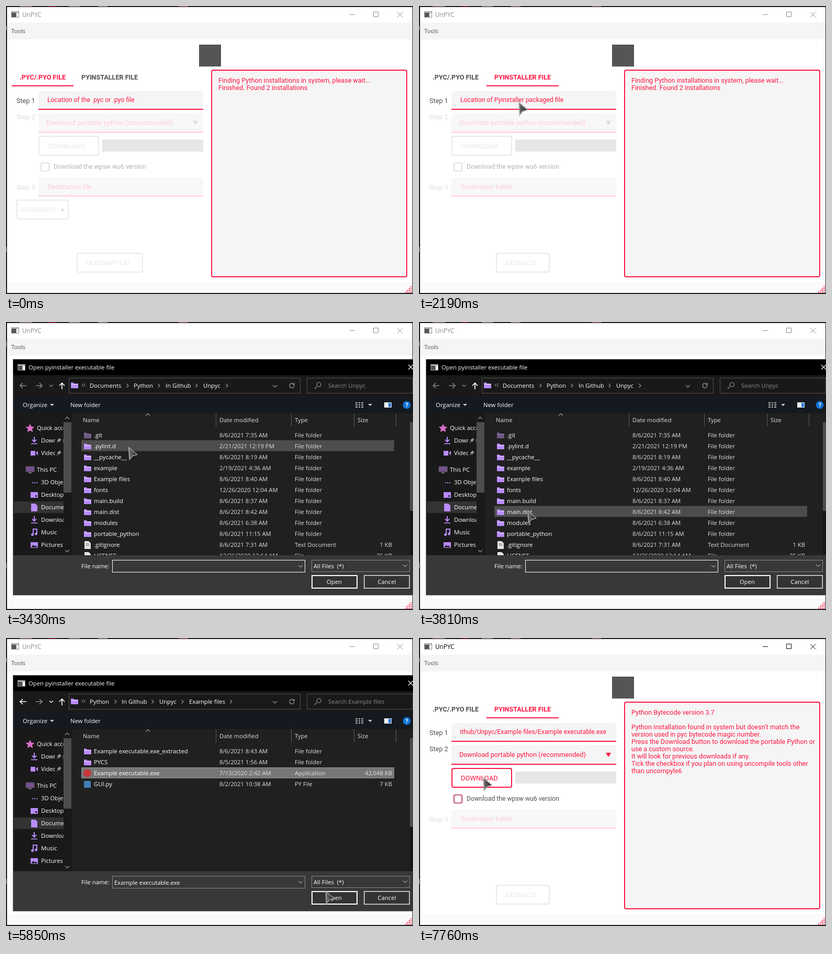
These frames come from a looping animation (778x552 px, 8 s). An HTML page:

```html
<!DOCTYPE html>
<html lang="en">
<head>
<meta charset="utf-8">
<title>UnPYC</title>
<style>
  html, body { margin: 0; width: 100%; height: 100%; overflow: hidden; background: #1b1b1d; }
  svg { display: block; width: 100vw; height: 100vh; }
  text { white-space: pre; }
  .app { font-family: Roboto, sans-serif; }
  .sys { font-family: "Open Sans", "Noto Sans", sans-serif; font-size: 11.25px; }
  .caps { font-weight: 700; font-size: 13px; letter-spacing: 1px; }
</style>
</head>
<body>
<svg id="stage" viewBox="0 0 778 552"></svg>
<script>
const LOOP = 8000;
const PINK = '#ff1744', PALE = '#ffcdd6', DARK = '#4f4f4f', PANEL = '#f5f5f5', FAINT = '#e9e9e9', LILAC = '#b98cff';

// Markup helpers
const rect = (x, y, w, h, fill, extra = '') =>
  `<rect x="${x}" y="${y}" width="${w}" height="${h}" fill="${fill}" ${extra}/>`;
const frame = (x, y, w, h, stroke, fill = 'none', width = 2, radius = 3) =>
  rect(x + width / 2, y + width / 2, w - width, h - width, fill, `stroke="${stroke}" stroke-width="${width}" rx="${radius}"`);
const line = (d, stroke, width = 1) => `<path d="${d}" fill="none" stroke="${stroke}" stroke-width="${width}"/>`;
const fill = (d, color) => `<path d="${d}" fill="${color}"/>`;
const at = (x, y, content) => `<g transform="translate(${x} ${y})">${content}</g>`;
const group = (id, content) => `<g id="${id}">${content}</g>`;
const app = (x, y, s, color, size = 12.6, extra = '') =>
  `<text class="app" x="${x}" y="${y}" fill="${color}" font-size="${size}" ${extra}>${s}</text>`;
const sys = (x, y, s, color = '#fff', extra = '') =>
  `<text class="sys" x="${x}" y="${y}" fill="${color}" ${extra}>${s}</text>`;
const chevron = (x, y, dx, dy, color = '#9a9a9a') =>
  line(dx ? `M${x - 1.5} ${y - 3.5}l3.5 3.5l-3.5 3.5` : `M${x - 4} ${y - 2 * dy}l4 ${4 * dy}l4 ${-4 * dy}`, color, 1.2);
const windowIcon = (x, y) => at(x, y,
  rect(0, 0, 15, 12, '#8d8d8d') + rect(1, 3, 8, 8, '#555') + rect(10, 3, 4, 8, '#fff') + rect(1, 1, 13, 1, '#e8e8e8'));

// Main window
function windowShell() {
  const specks = rect(82, 0, 14, 1, '#c4122f') + rect(26, 0, 24, 1, '#d7a5a8') + rect(176, 0, 18, 1, '#e3b4b8') +
    rect(120, 0, 22, 1, '#bbb') + rect(330, 0, 18, 1, '#e88') + rect(0, 38, 1, 8, '#aaa') + rect(0, 462, 1, 10, '#aaa');
  let grip = '';
  for (let row = 0; row < 4; row++)
    for (let col = 3 - row; col < 4; col++) grip += rect(763 + col * 3.5, 537 + row * 3.5, 2, 2, PINK);
  return rect(0, 0, 778, 552, '#1b1b1d') + specks + rect(2, 2, 775, 548, '#fff') + rect(2, 32, 775, 32, PANEL) +
    rect(2, 529, 775, 21, '#fafafa') + grip + windowIcon(10, 10) + sys(10, 52, 'Tools', DARK) +
    group('caption', sys(31, 21, 'UnPYC', 'currentColor', 'style="font-size:11.8px"') +
      line('M657 16.5h10M702.5 11.5h9v9h-9zM748 11.5l10 10M758 11.5l-10 10', 'currentColor'));
}

function button(x, y, w, label, textX, color) {
  return frame(x, y, w, 38, color, '#fff') + app(textX, y + 24, label, color, 13, 'class="app caps"');
}

function field(y, h, on) {
  return fill(`M62 ${y + h}v${4 - h}q0 -4 4 -4h307q4 0 4 4v${h - 4}z`, on ? PANEL : '#f8f8f8') +
    rect(62, y + h - 2, 315, 2, on ? PINK : PALE);
}

function page({ tab, location, alignEnd, ready, destination, log, buttons }) {
  const pick = on => on ? PINK : PALE;
  const step = (y, n, on) => app(20, y, 'Step ' + n, on ? DARK : '#dcdcdc');
  const tabLabel = (x, s, i) => app(x, 141, s, tab === i ? PINK : DARK, 12.6, 'font-weight="700"');
  return rect(369, 74, 42, 42, '#555') +
    tabLabel(26, '.PYC/.PYO FILE', 0) + tabLabel(144, 'PYINSTALLER FILE', 1) +
    (tab ? rect(129, 152, 138, 2, PINK) : rect(11, 152, 118, 2, PINK)) +
    step(186, 1, true) + field(163, 36, true) +
    (alignEnd
      ? `<svg x="78" y="163" width="290" height="34">${app(280, 21, location, PINK, 12.25, 'text-anchor="end"')}</svg>`
      : app(79, 184, location, PINK, 12.25)) +
    step(217, 2, ready) + field(205, 38, ready) +
    app(77, 228, 'Download portable python (recommended)', pick(ready), 12.7) +
    fill('M357 220h10l-5 8z', ready ? PINK : '#dcdcdc') +
    button(62, 249, 116, 'DOWNLOAD', 80, ready ? PINK : FAINT) + rect(184, 256, 193, 23, '#e6e6e6') +
    frame(66, 300, 17, 17, ready ? '#b5304f' : '#dcdcdc', '#fff', 1.6, 2) +
    app(91, 312, 'Download the wpsw wu6 version', ready ? DARK : '#b4b4b4', 12.2) +
    step(352, 3, false) + field(329, 36, false) + app(80, 351, destination, PALE, 12.5) + buttons +
    frame(392, 122, 375, 398, PINK, PANEL) + log.map((s, i) => app(406, 147 + 14 * i, s, PINK)).join('');
}

const searchLog = ['Finding Python installations in system, please wait...', 'Finished. Found 2 installations'];
const extract = { tab: 1, destination: 'Destination folder', buttons: button(147, 473, 103, 'EXTRACT!', 165, FAINT) };
const pages = {
  pycPage: page({
    tab: 0, location: 'Location of the .pyc or .pyo file', destination: 'Destination file', log: searchLog,
    buttons: button(20, 371, 100, 'ADVANCED', 27, FAINT) + fill('M106 387l6 3.5l-6 3.5z', '#dcdcdc') +
      button(135, 473, 127, 'UMCOMPYLE!', 153, FAINT)
  }),
  exePage: page({ ...extract, location: 'Location of Pyinstaller packaged file', log: searchLog }),
  readyPage: page({
    ...extract, location: '/In Github/Unpyc/Example files/Example executable.exe', alignEnd: true, ready: true,
    log: ['Python Bytecode version 3.7', '',
      'Python installation found in system but doesn’t match the', 'version used in pyc bytecode magic number.',
      'Press the Download button to download the portable Python or', 'use a custom source.',
      'It will look for previous downloads if any.',
      'Tick the checkbox if you plan on using uncompile tools other', 'than uncompyle6']
  })
};

// File dialog
const icons = {
  folder: fill('M0 0h5l1 2h8v9H0z', LILAC) + rect(1, 3, 12, 1, '#ead9ff'),
  hidden: fill('M0 0h5l1 2h8v9H0z', '#6f5a86') + rect(1, 3, 12, 1, '#8d7a9f'),
  file: fill('M1 -2h8l4 4v11h-12z', '#e4e4e4'),
  text: fill('M1 -2h8l4 4v11h-12z', '#e4e4e4') + line('M3.5 2.5h6M3.5 4.5h7M3.5 6.5h7', '#888'),
  purpleFile: fill('M1 -2h8l4 4v11h-12z', LILAC),
  exe: '<circle cx="6.5" cy="5" r="7.5" fill="#c8383c"/>',
  py: rect(0, -1, 13, 13, '#3f7fb5'),
  star: fill('M7 -3l2.5 5.5l6 .6l-4.500 4l1.300 6l-5.300 -3.100l-5.300 3.100l1.300 -6l-4.500 -4l6 -.6z', '#d86fc8'),
  down: line('M7 -2v9M3 3.500l4 4l4 -4', LILAC, 2) + rect(1, 10.500, 12, 1.600, LILAC),
  video: rect(0, 1, 9, 9, LILAC) + fill('M10 5l4 -4v9z', LILAC),
  pc: rect(-1, -1, 16, 10, '#76508f', 'stroke="#555"') + rect(4, 10, 6, 2, '#777'),
  dots: [3, 7, 11].map(x => rect(x, 5, 2, 2, LILAC)).join(''),
  desktop: rect(0, 0, 14, 11, LILAC) + rect(9, 6, 3, 3, '#222'),
  music: line('M5 9v-10h7v8', LILAC, 2) + '<circle cx="3.5" cy="9.500" r="2.500" fill="#b98cff"/><circle cx="10.500" cy="8" r="2.500" fill="#b98cff"/>',
  picture: rect(0, 0, 14, 11, LILAC) + fill('M1 10l4 -5l3 3l2 -2l3 4z', '#222')
};
const icon = (name, x, centerY) => at(x, centerY - 5, icons[name]);

function sidebar() {
  const entry = (x, y, label) => sys(x, y + 4, label);
  const pin = y => rect(94, y - 9, 15, 18, '#191919') +
    fill(`M102 ${y - 5}l4 4l-2 1l-2 3l-2 -1l-4 4l3 -5l-1 -2l3 -2z`, '#8f8f9f');
  const places = [['3D Objects', 307], ['Desktop', 331], ['Documents', 355], ['Downloads', 379], ['Music', 403], ['Pictures', 427], ['Videos', 451]];
  return rect(14, 175, 112, 272, '#191919') + rect(15, 344, 95, 22, '#333') +
    entry(59, 203, 'Quick access') + entry(67, 227, 'Downloads') + entry(67, 251, 'Videos') + entry(59, 283, 'This PC') +
    places.map(([s, y]) => entry(67, y, s)).join('') + pin(227) + pin(251) +
    icon('star', 39, 203) + icon('pc', 39, 283) + icon('dots', 47, 307) + icon('desktop', 47, 331) + icon('down', 47, 379) +
    rect(110, 175, 16, 272, '#191919') + rect(110, 192, 15, 135, '#4d4d4d') +
    chevron(117, 184, 0, -1) + chevron(117, 439, 0, 1);
}

function sheet() {
  const columns = [['Name', 147], ['Date modified', 408], ['Type', 552], ['Size', 672]];
  return rect(14, 102, 764, 42, '#191919') + rect(14, 144, 764, 31, '#151a20') + rect(126, 175, 652, 272, '#202020') +
    frame(120, 107, 443, 30, '#535353', 'none', 1, 0) + frame(575, 107, 203, 30, '#535353', 'none', 1, 0) +
    line('M57 122h12M64 117l5 5l-5 5', '#858585', 1.700) + line('M107 129v-12M102 122l5 -5l5 5', '#fff', 1.700) +
    icon('folder', 124, 121) + line('M148 118l-3 3l3 3M152 118l-3 3l3 3', '#aaa') + chevron(514, 123, 0, 1) +
    line('M550 119a4.500 4.500 0 1 0 1 3M551 117v3h-3', '#999', 1.300) +
    line('M594 124l-4 4M594 120a4 4 0 1 1 8 0a4 4 0 1 1 -8 0', '#9a9a9a', 1.200) +
    sys(32, 163, 'Organize') + fill('M84 157h8l-4 4z', '#ccc') + sys(123, 163, 'New folder') +
    [154, 158, 162].map(y => rect(668, y, 4, 2, '#bbb') + rect(674, y, 3, 2, '#bbb') + rect(679, y, 4, 2, '#bbb')).join('') +
    fill('M692 157h8l-4 4z', '#ccc') + rect(723, 154, 14, 10, '#eee') + rect(731, 155, 5, 8, '#2d7fd8') +
    '<circle cx="766" cy="159" r="7.5" fill="#1173d4"/>' + sys(763.5, 163, '?', '#fff', 'font-weight="700"') +
    columns.map(([s, x]) => sys(x, 192, s, '#dedede')).join('') + chevron(271, 177.500, 0, -1) +
    [401, 545, 665, 745].map(x => rect(x, 175, 1, 25, '#5c5c5c')).join('') +
    icon('purpleFile', 47, 355) + icon('music', 47, 403) + icon('picture', 47, 427) + icon('video', 47, 451) +
    icon('down', 47, 227) + icon('video', 47, 251) +
    rect(772, 192, 6, 170, '#4d4d4d') + rect(772, 362, 6, 85, '#171717');
}

function folderView(crumbs, searchName, backColor, rows) {
  return crumbs.map(([s, x, chevronX]) => sys(x, 126, s) + chevron(chevronX, 122, 1, 0)).join('') +
    sys(616, 126, 'Search ' + searchName, '#8c8c8c') +
    line('M27 122h12M32 117l-5 5l5 5', backColor, 1.700) + line('M83 120.500l3.500 3l3.500 -3', backColor, 1.500) +
    rows.map(([kind, name, date, type, size = ''], i) => {
      const y = 217 + 21 * i;
      return icon(kind, 149, y) + sys(168, y + 4, name) + sys(408, y + 4, date, '#dedede') +
        sys(552, y + 4, type, '#dedede') + sys(738, y + 4, size, '#dedede', 'text-anchor="end"');
    }).join('');
}

const folderRow = (name, date, kind = 'folder') => [kind, name, date, 'File folder'];
const projectView = folderView(
  [['Documents', 160, 232], ['Python', 244, 292], ['In Github', 305, 364], ['Unpyc', 377, 422]], 'Unpyc', '#858585', [
    folderRow('.git', '8/6/2021 7:35 AM', 'hidden'), folderRow('.pylint.d', '2/21/2021 12:19 PM'),
    folderRow('__pycache__', '8/6/2021 8:19 AM'), folderRow('example', '2/19/2021 4:36 AM'),
    folderRow('Example files', '8/6/2021 8:40 AM'), folderRow('fonts', '12/26/2020 12:04 AM'),
    folderRow('main.build', '8/6/2021 8:37 AM'), folderRow('main.dist', '8/6/2021 8:42 AM'),
    folderRow('modules', '8/6/2021 6:38 AM'), folderRow('portable_python', '8/6/2021 11:15 AM'),
    ['text', '.gitignore', '8/6/2021 7:31 AM', 'Text Document', '1 KB'],
    ['file', 'LICENSE', '12/26/2020 12:14 AM', 'File', '35 KB']
  ]);
const exampleView = folderView(
  [['Python', 160, 209], ['In Github', 221, 280], ['Unpyc', 293, 337], ['Example files', 350, 430]], 'Example files', '#fff', [
    folderRow('Example executable.exe_extracted', '8/6/2021 8:43 AM'), folderRow('PYCS', '8/5/2021 1:56 AM'),
    ['exe', 'Example executable.exe', '7/13/2020 2:42 AM', 'Application', '42,048 KB'],
    ['py', 'GUI.py', '8/2/2021 10:38 AM', 'PY File', '7 KB']
  ]);

const controls = sys(144, 472, 'File name:') +
  `<rect id="nameBox" x="203.500" y="456.500" width="368" height="23" fill="#383838"/>` + chevron(563, 468, 0, 1) +
  group('fileName', sys(207, 473, 'Example executable.exe')) +
  frame(584, 456, 188, 23, '#8a8a8a', '#383838', 1, 0) + sys(588, 472, 'All Files  (*)') + chevron(763, 467, 0, 1) +
  frame(584, 485, 88, 26, '#fff', '#333', 2, 0) + sys(627.500, 502, 'Open', '#fff', 'text-anchor="middle"') +
  frame(684, 485, 88, 26, '#e6e6e6', '#333', 1.500, 0) + sys(728, 502, 'Cancel', '#fff', 'text-anchor="middle"');
const blanks = icon('file', 47, 227) + icon('file', 47, 251) + rect(772, 192, 6, 170, '#444') + rect(772, 362, 6, 68, '#171717') +
  [[144, 460, 54, 15], [203, 456, 369, 24], [584, 456, 188, 23], [584, 485, 88, 26], [684, 485, 88, 26], [772, 506, 6, 17]]
    .map(box => rect(...box, '#fff')).join('');

const dialog = rect(13, 71, 765, 453, '#6a6a6a') + rect(14, 72, 764, 30, '#000') + rect(14, 102, 764, 421, '#fff') +
  windowIcon(22, 81) + sys(43, 91, 'Open pyinstaller executable file') + line('M769 82l9 9M778 82l-9 9', '#fff', 1.200) +
  group('sidebar', sidebar()) +
  group('sheet', sheet() +
    '<rect id="selected" x="144.500" width="597" height="20" fill="#777" stroke="#919191"/>' +
    '<rect id="hover" x="144" width="598" height="21" fill="#4d4d4d"/>' +
    group('projectView', projectView) + group('exampleView', exampleView)) +
  group('footer', rect(14, 447, 764, 76, '#383838') + group('blanks', blanks) + group('controls', controls));

const pointer = `<defs><linearGradient id="shade"><stop stop-color="#777"/><stop offset="1" stop-color="#1c1c1c"/></linearGradient></defs>` +
  group('pointer', '<path d="M1 1L2.500 25L8 18L17 15Z" fill="url(#shade)" stroke="#555" stroke-width="2.500" stroke-opacity=".4"/>' +
    '<path d="M1 1L2.500 24.500L8 17.500L17 15Z" fill="url(#shade)" stroke="#d0d0d0" stroke-width="1"/>');

document.getElementById('stage').innerHTML = windowShell() +
  Object.entries(pages).map(([id, content]) => group(id, content)).join('') + group('dialog', dialog) + pointer;

// Timeline
const pointerPath = [ // time, x, y
  [580, 508, 511], [960, 280, 198], [1100, 141, 94], [1180, 175, 137], [1680, 175, 137], [1750, 190, 184],
  [2780, 190, 184], [3200, 231, 214], [3550, 235, 252], [3600, 235, 252], [3810, 207, 361], [4070, 207, 361],
  [4450, 200, 292], [5240, 200, 292], [5340, 200, 263], [5510, 200, 263], [5850, 610, 484], [6050, 626, 516],
  [6250, 612, 487], [7300, 612, 487], [7760, 122, 267]
];
const el = id => document.getElementById(id);
const show = (id, on) => { el(id).style.display = on ? '' : 'none'; };
const within = (t, from, to) => t >= from && t < to;

function pointerAt(t) {
  const next = pointerPath.findIndex(p => p[0] > t);
  if (next < 1) return pointerPath[next < 0 ? pointerPath.length - 1 : 0].slice(1);
  const [t0, x0, y0] = pointerPath[next - 1], [t1, x1, y1] = pointerPath[next];
  const k = (t - t0) / (t1 - t0);
  return [x0 + (x1 - x0) * k, y0 + (y1 - y0) * k];
}

function render(t) {
  const [x, y] = pointerAt(t);
  const inExample = t >= 4830;
  show('pointer', t >= 580);
  el('pointer').setAttribute('transform', `translate(${x} ${y})`);
  el('caption').style.color = within(t, 1420, 2100) || t >= 6940 ? '#000' : '#8c8c8c';

  show('pycPage', t < 1400);
  show('exePage', within(t, 1400, 6940));
  show('readyPage', t >= 6940);

  show('dialog', within(t, 2780, 6765));
  show('sidebar', t >= 3050);
  show('footer', t >= 3050);
  show('blanks', t < 3300);
  show('sheet', t >= 3300);
  show('controls', t >= 3300);
  show('projectView', !inExample);
  show('exampleView', inExample);
  show('fileName', t >= 5320);
  el('nameBox').setAttribute('stroke', t < 4500 ? '#fff' : '#8a8a8a');

  const selectedRow = within(t, 4500, 4830) ? 4 : t >= 5320 ? 2 : -1;
  const hoverRow = Math.floor((y - 206) / 21);
  const rowCount = inExample ? 4 : 12;
  show('selected', selectedRow >= 0);
  el('selected').setAttribute('y', 206.5 + 21 * selectedRow);
  show('hover', hoverRow >= 0 && hoverRow < rowCount && hoverRow !== selectedRow && x < 742);
  el('hover').setAttribute('y', 206 + 21 * hoverRow - 0.5);
}

function tick() {
  render(performance.now() % LOOP);
  requestAnimationFrame(tick);
}
tick();
</script>
</body>
</html>
```
